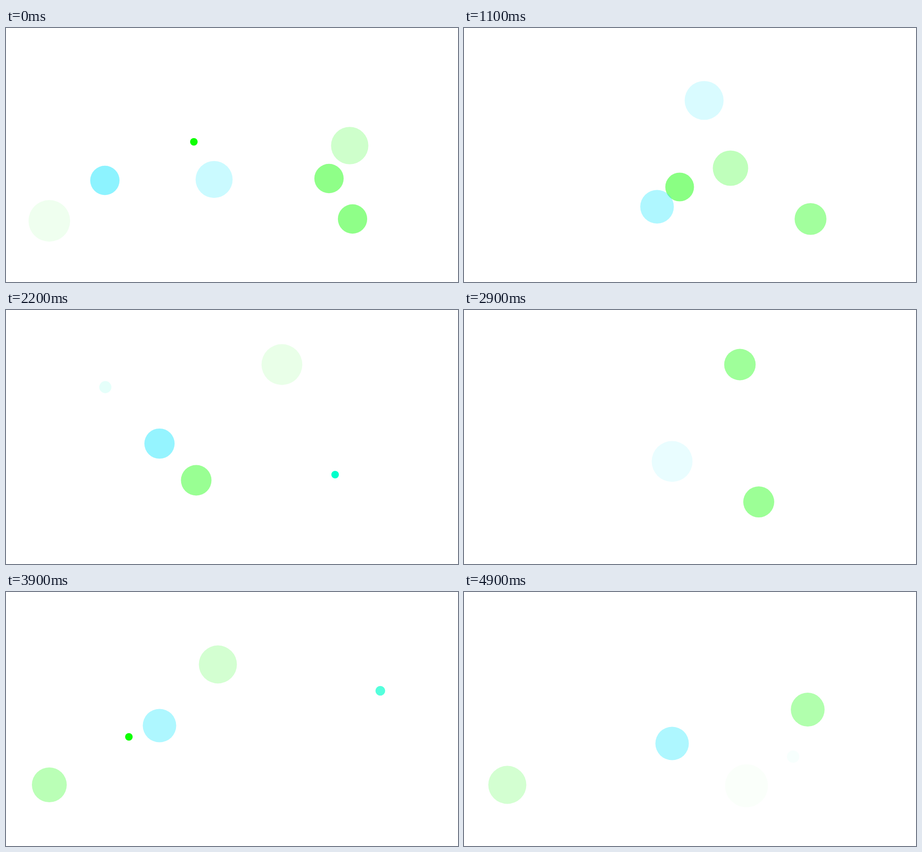
An HTML page with a canvas for the animation above (5 s loop, 960 by 540 pixels).

```html
<!DOCTYPE html>
<html lang="en">
<head>
<meta charset="utf-8">
<title>Pulses</title>
<style>
  html, body { margin: 0; width: 100%; height: 100%; overflow: hidden; background: #fff; }
  canvas { display: block; }
</style>
</head>
<body>
<canvas id="stage" width="960" height="540"></canvas>
<script>
const LOOP = 5000, STEP = 100, LIFE = 430;
const ctx = document.getElementById('stage').getContext('2d');

// radius, growth, growth exponent, starting opacity
const disc = { r: 30, grow: 16.3, ease: 1, alpha: 0.5 };
const dot = { r: 8, grow: 5.3, ease: 0.75, alpha: 1 };
const kinds = {
  G: { ...disc, color: '#0fff00' },
  C: { ...disc, color: '#0ce5ff' },
  g: { ...dot, color: '#0dff00' },
  t: { ...dot, color: '#00ffcb' }
};

// kind, x, y, then the start times of its pulses in ms
const nodes = [
  ['G', 458, 338, 1087],
  ['G', 600, 412, 4487],
  ['G', 736, 406, 4970, 290, 1000],
  ['G', 686, 320, 4970, 640],
  ['C', 210, 324, 4970],
  ['C', 510, 154, 290, 800],
  ['C', 228, 434, 325],
  ['C', 410, 380, 545, 950],
  ['G', 566, 298, 497, 900, 1405],
  ['C', 406, 186, 1272, 1650],
  ['C', 326, 284, 1392, 2144, 2330, 3450, 3754, 4250],
  ['G', 404, 362, 1354, 2135, 2450],
  ['G', 586, 116, 1847, 2310, 2810, 3250],
  ['C', 442, 322, 2547, 3100, 4754],
  ['G', 626, 408, 2823, 3300],
  ['G', 450, 154, 3625, 4000],
  ['G', 92, 410, 3715, 4080, 4625],
  ['G', 730, 250, 4400, 4745],
  ['g', 399, 242, 0],
  ['g', 489, 364, 346],
  ['t', 53, 322, 488],
  ['g', 89, 355, 600],
  ['t', 123, 130, 1177],
  ['g', 671, 130, 1440],
  ['t', 211, 164, 1813],
  ['t', 699, 350, 2200, 3200, 4483],
  ['g', 261, 308, 3900, 4330],
  ['t', 795, 210, 3758]
];

function drawPulse(kind, x, y, p) {
  ctx.globalAlpha = kind.alpha * (1 - p);
  ctx.fillStyle = kind.color;
  ctx.beginPath();
  ctx.arc(x, y, kind.r + kind.grow * p ** kind.ease, 0, Math.PI * 2);
  ctx.fill();
}

function render(time) {
  ctx.clearRect(0, 0, 960, 540);
  for (const [key, x, y, ...starts] of nodes) {
    for (const start of starts) {
      const age = (time - start + LOOP) % LOOP;
      if (age < LIFE) drawPulse(kinds[key], x, y, age / LIFE);
    }
  }
}

const begin = performance.now();
function tick(now) {
  const time = Math.max(0, now - begin) % LOOP;
  render(Math.floor(time / STEP) * STEP);
  requestAnimationFrame(tick);
}
render(0);
requestAnimationFrame(tick);
</script>
</body>
</html>
```
